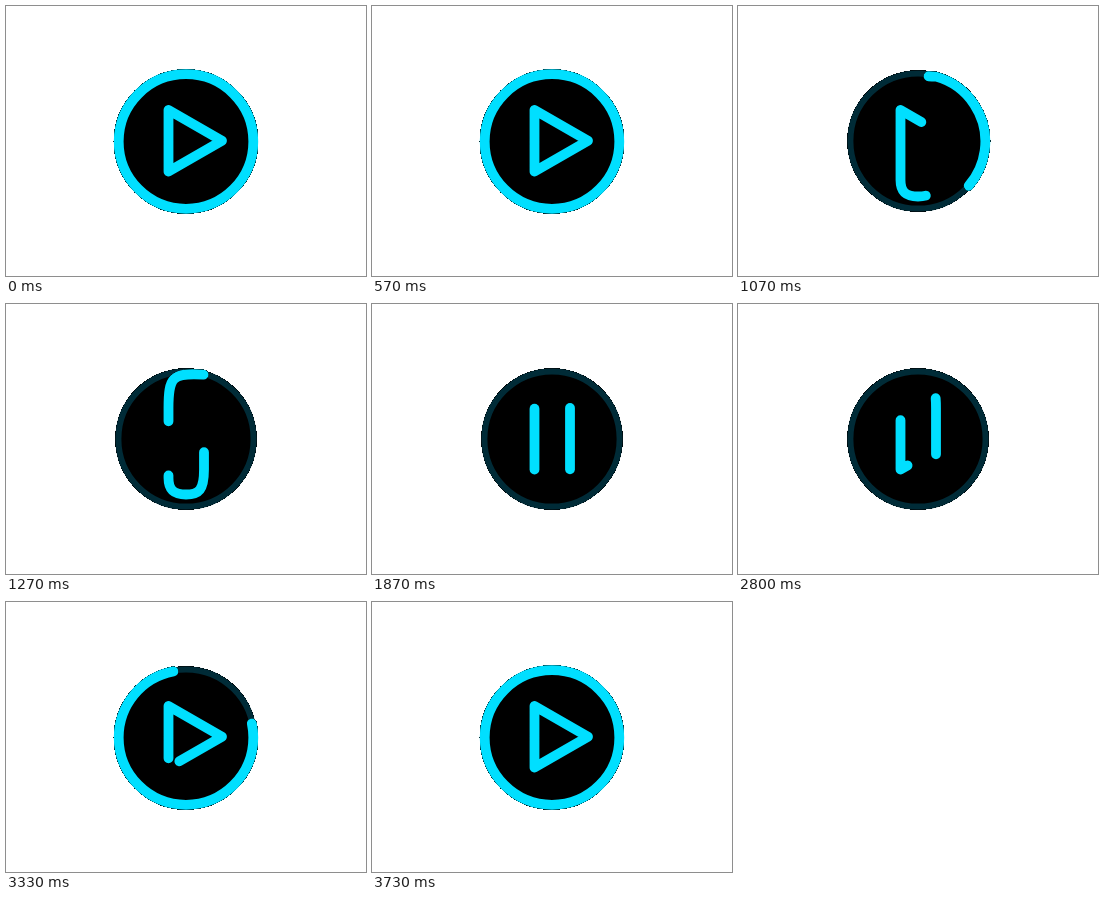
Recreate the animation shown at these times as an HTML page. Size 360 by 270 pixels, loop 4510 ms.

```html
<!DOCTYPE html>
<html lang="en">
<head>
<meta charset="utf-8">
<title>Play and pause</title>
<style>
  html, body { margin: 0; width: 100%; height: 100%; overflow: hidden; background: #fff; }
  svg { display: block; width: 100vw; height: 100vh; }
  path { fill: none; stroke-linecap: round; stroke-linejoin: round; }
  .line { stroke: #00dfff; stroke-width: 9.8; }
  .edge { stroke: #000; stroke-width: 10.4; }
  .crisp { shape-rendering: crispEdges; }
</style>
</head>
<body>
<svg viewBox="0 0 360 270">
  <circle class="crisp" cx="180" cy="135" r="71" fill="#000"/>
  <circle cx="180" cy="135" r="67.6" fill="none" stroke="#002b37" stroke-width="6"/>
  <path id="edge" class="edge crisp"/>
  <path id="outer" class="line"/>
  <path id="inner" class="line"/>
</svg>
<script>
const LOOP = 4510;
const BAR = 61.5;
const RADIUS = 67.3;
const RING = 2 * Math.PI * RADIUS;
const TRI = BAR + 2 * Math.hypot(53.5, 30.75);

const ARC = `A${RADIUS} ${RADIUS} 0 0 0 `;
const LAP = `${ARC}180 202.8 ${ARC}180 68.2`;
const SIDES = 'L216 134.75 L162.5 104 V165.5';

const paths = {
  ring: `M180 68.2 ${LAP}`,
  ringToBar: `M180 68.2 ${ARC}180 202.8 ${ARC}198 70.65 C166 68.5 162.5 73 162.5 104 V165.5`,
  triToBar: `M162.5 165.5 ${SIDES} V174 C162.5 186 168 190.5 180 190.5 C193 190.5 198 186 198 165.5 V104`,
  barToRing: `M198 165.5 V104 C198 78 192 68.2 180 68.2 ${LAP} ${ARC}160 71.24`,
  barToTri: `M162.5 104 V165.5 ${SIDES} L216 134.75`
};

const [edge, outer, inner] = ['edge', 'outer', 'inner'].map(id => document.getElementById(id));

const length = {};
for (const name in paths) {
  inner.setAttribute('d', paths[name]);
  length[name] = inner.getTotalLength();
}

const mix = (a, b, k) => a + (b - a) * k;
const clamp = x => Math.min(1, Math.max(0, x));
const easeOut = (u, power) => 1 - Math.pow(1 - u, power);

// Smooth curve through [time, value, slope] keys
function track(t, keys) {
  if (t <= keys[0][0]) return keys[0][1];
  for (let i = 1; i < keys.length; i++) {
    const [t0, v0, m0] = keys[i - 1], [t1, v1, m1] = keys[i];
    if (t > t1) continue;
    const d = t1 - t0, u = (t - t0) / d, w = 1 - u;
    return v0 * (1 + 2 * u) * w * w + m0 * d * u * w * w
         + v1 * u * u * (3 - 2 * u) - m1 * d * u * u * w;
  }
  return keys[keys.length - 1][1];
}

// Shows the part of a path between two distances
function show(el, name, from, to) {
  el.setAttribute('d', paths[name]);
  el.setAttribute('stroke-dasharray', `${Math.max(0.01, to - from)} 2000`);
  el.setAttribute('stroke-dashoffset', -from);
}

function showOuter(name, from, to) {
  show(edge, name, from, to);
  show(outer, name, from, to);
}

function openRing(t) {
  const gap = RING * 0.2 * clamp((t - 630) / 300);
  showOuter('ring', gap, RING - gap);
  show(inner, 'triToBar', 0, TRI);
}

function toPause(t) {
  const u = clamp((t - 930) / 940);
  const a = length.ringToBar, b = length.triToBar;
  showOuter('ringToBar',
    mix(RING * 0.2, a - BAR, easeOut(u, 4.05)),
    mix(RING * 0.8, a, easeOut(u, 3)));
  show(inner, 'triToBar',
    mix(0, b - BAR, easeOut(u, 3)),
    mix(TRI, b, easeOut(u, 2.45)));
}

function toPlay(t) {
  showOuter('barToRing',
    track(t, [[2570, 0, 0], [2800, 15, 0.25], [3070, 118, 0.05], [3200, 119, 0]]),
    track(t, [[2570, BAR, 0], [2800, 71, 0.25], [3070, 284, 0.75], [3730, 119 + RING, 0.12]]));
  show(inner, 'barToTri',
    track(t, [[2570, 0, 0], [2800, 12, 0.15], [3070, 74, 0]]),
    track(t, [[2570, BAR, 0], [2800, 69.5, 0.15], [3070, 169, 0.36], [3600, 74 + TRI, 0]]));
}

function draw(t) {
  if (t < 930) openRing(t);
  else if (t < 2570) toPause(t);
  else if (t < 3730) toPlay(t);
  else openRing(0);
}

const start = performance.now();
function tick() {
  draw((performance.now() - start) % LOOP);
  requestAnimationFrame(tick);
}
tick();
</script>
</body>
</html>
```
